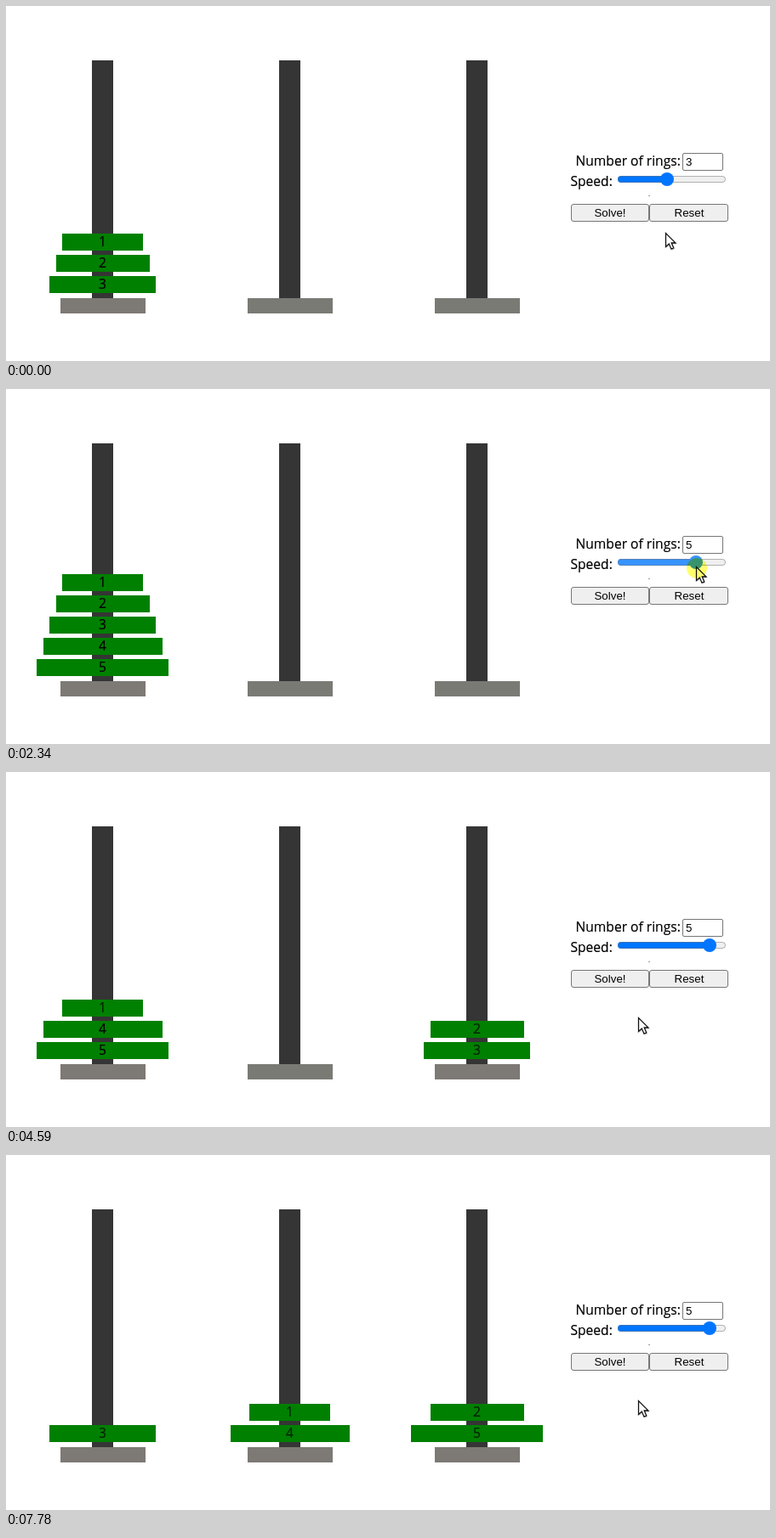
Recreate the animation shown at these times as an HTML page. Size 898x418 px, loop 8000 ms.

```html
<!DOCTYPE html>
<html lang="en">
<head>
<meta charset="utf-8">
<title>Tower of Hanoi</title>
<style>
html, body { margin: 0; width: 100%; height: 100%; overflow: hidden; background: #fff; }
svg { display: block; width: 100%; height: 100%; }
.label { font: 15.6px "Open Sans", "Noto Sans", sans-serif; stroke: #000; stroke-width: .2px; }
.ui { font: 13.333px "Liberation Sans", Arial, sans-serif; }
.mid { text-anchor: middle; }
.halo { mix-blend-mode: multiply; }
</style>
</head>
<body>
<svg id="stage" viewBox="0 0 898 418"></svg>
<script>
const LOOP = 8000, TICK = 78.5;
const FIRST_MOVE = 3515, MOVE_EVERY = 211;
const stage = document.getElementById('stage');

function set(el, attrs) {
  for (const k in attrs) el.setAttribute(k, attrs[k]);
}
function add(tag, attrs, text) {
  const el = document.createElementNS('http://www.w3.org/2000/svg', tag);
  set(el, attrs);
  if (text !== undefined) el.textContent = text;
  return stage.appendChild(el);
}
const rect = (x, y, width, height, fill, more) => add('rect', { x, y, width, height, fill, ...more });
const show = (el, on) => set(el, { visibility: on ? 'visible' : 'hidden' });

// Pegs and rings
const bases = [0, 1, 2].map(i => {
  rect(101 + 220 * i, 64, 25, 280, '#353535');
  return rect(64 + 220 * i, 344, 100, 18, '#7a7a75');
});
const rings = [1, 2, 3, 4, 5].map(n => ({
  width: 80 + 15 * n,
  bar: rect(0, 0, 80 + 15 * n, 20, '#008000'),
  text: add('text', { class: 'label mid' }, n)
}));

// Controls
add('text', { class: 'label', x: 669.5, y: 188 }, 'Number of rings:');
add('text', { class: 'label', x: 663.5, y: 211.5 }, 'Speed:');
rect(795.5, 173.5, 47, 20, '#fff', { rx: 1.5, stroke: '#767676' });
const focusRing = rect(796, 174, 46, 19, 'none', { rx: 1.5, stroke: '#101010', 'stroke-width': 2 });
const spinner = [
  rect(825, 176, 14, 15, '#efefef'),
  add('path', { d: 'M827.5 182L831.5 178L835.5 182ZM827.5 185L831.5 189L835.5 185Z', fill: '#505050' })
];
const count = add('text', { class: 'ui', x: 799, y: 188 });
const caret = rect(806, 176, 1, 15, '#000');

rect(719, 200, 127, 8, '#efefef', { rx: 4 });
const fill = rect(719, 200, 58, 8, '#0075ff', { rx: 4 });
rect(719.5, 200.5, 126, 7, 'none', { rx: 3.5, stroke: '#767676', 'stroke-opacity': .5 });
const thumb = add('circle', { cy: 204, r: 8 });
rect(755, 223, 2, 1, '#9a9a9a');

const buttons = [['Solve!', 664, 92], ['Reset', 756, 93]].map(([name, x, w]) => {
  const box = rect(x + .5, 233.5, w - 1, 20, '#efefef', { rx: 2.5, stroke: '#767676' });
  add('text', { class: 'ui mid', x: Math.ceil(x + w / 2), y: 248 }, name);
  return { box, x, w };
});

// Pointer
const arrow = 'M.5 .5V16.5L4.3 13L7 19.2L9.8 18L7.2 12H12Z';
const shadow = add('path', { d: arrow, opacity: .2 });
const pointer = add('path', { d: arrow, fill: '#fff', stroke: '#111', 'stroke-width': 1.3 });
const halo = add('circle', { class: 'halo', r: 12, fill: '#ffff6e' });

// Places the pointer visits: x, y, arrival, departure
const stops = [
  [775, 267, 0, 0], [844, 190, 780, 780], [831, 178, 1090, 1330], [791, 194, 1560, 1560],
  [778, 208, 1720, 1800], [827, 210, 2500, 2560], [686, 241, 3110, 3340], [743, 289, 3500, LOOP]
];
const presses = [[1090, 1170], [1250, 1330], [1720, 2560], [3190, 3340]];

function pointerAt(t) {
  const i = Math.max(1, stops.findIndex(s => t <= s[3]));
  const a = stops[i - 1], b = stops[i];
  const k = Math.min(1, Math.max(0, (t - a[3]) / (b[2] - a[3])));
  return [0, 1].map(j => Math.round(a[j] + (b[j] - a[j]) * k));
}

// Recursive solution, one [ring, peg] per move
function solve(n, from, to, via) {
  return n ? [...solve(n - 1, from, via, to), [n, to], ...solve(n - 1, via, to, from)] : [];
}
const moves = solve(5, 0, 2, 1);

function drawRings(t, total) {
  const done = Math.max(0, Math.floor((t - FIRST_MOVE) / MOVE_EVERY) + 1);
  const peg = new Map(moves.slice(0, done));
  const height = [0, 0, 0];
  for (let n = rings.length; n > 0; n--) {
    const { bar, text, width } = rings[n - 1], at = peg.get(n) || 0;
    show(bar, n <= total);
    show(text, n <= total);
    if (n > total) continue;
    const mid = 113.5 + 220 * at, y = 318 - 25 * height[at]++;
    set(bar, { x: Math.ceil(mid - width / 2), y });
    set(text, { x: mid, y: y + 15, opacity: peg.has(n) ? .75 : 1 });
  }
  bases.forEach((b, i) => set(b, { fill: height[i] ? '#7d7975' : '#7a7a75' }));
}

function draw(t) {
  const [x, y] = pointerAt(68 + TICK * Math.floor((t - 68) / TICK));
  const over = (left, top, w, h) => x >= left && x < left + w && y >= top && y < top + h;
  const pressed = presses.some(([from, to]) => t >= from && t < to);
  const total = t < 1170 ? 3 : t < 1330 ? 4 : 5;
  drawRings(t, total);

  const focused = t >= 1090 && t < 1720;
  count.textContent = total;
  show(focusRing, focused);
  show(caret, focused);
  spinner.forEach(s => show(s, focused || over(795, 173, 48, 21)));

  const knob = t < 1720 ? 777 : t < 2500 ? Math.max(777, x) : 827;
  const hover = over(719, 196, 127, 16);
  const blue = !hover ? '#0075ff' : pressed ? '#3793ff' : '#005cc8';
  set(fill, { width: knob - 719, fill: blue });
  set(thumb, { cx: knob, fill: blue });

  for (const { box, x: left, w } of buttons) {
    const [face, edge] = !over(left, 233, w, 21) ? ['#efefef', '#767676']
      : pressed ? ['#f5f5f5', '#8d8d8d'] : ['#e5e5e5', '#4f4f4f'];
    set(box, { fill: face, stroke: edge });
  }

  show(halo, pressed);
  set(halo, { cx: x + 1, cy: y + 2 });
  set(pointer, { transform: `translate(${x} ${y})` });
  set(shadow, { transform: `translate(${x + 1} ${y + 1.5})` });
}

const start = performance.now();
function frame() {
  draw((performance.now() - start) % LOOP);
  requestAnimationFrame(frame);
}
frame();
</script>
</body>
</html>
```
